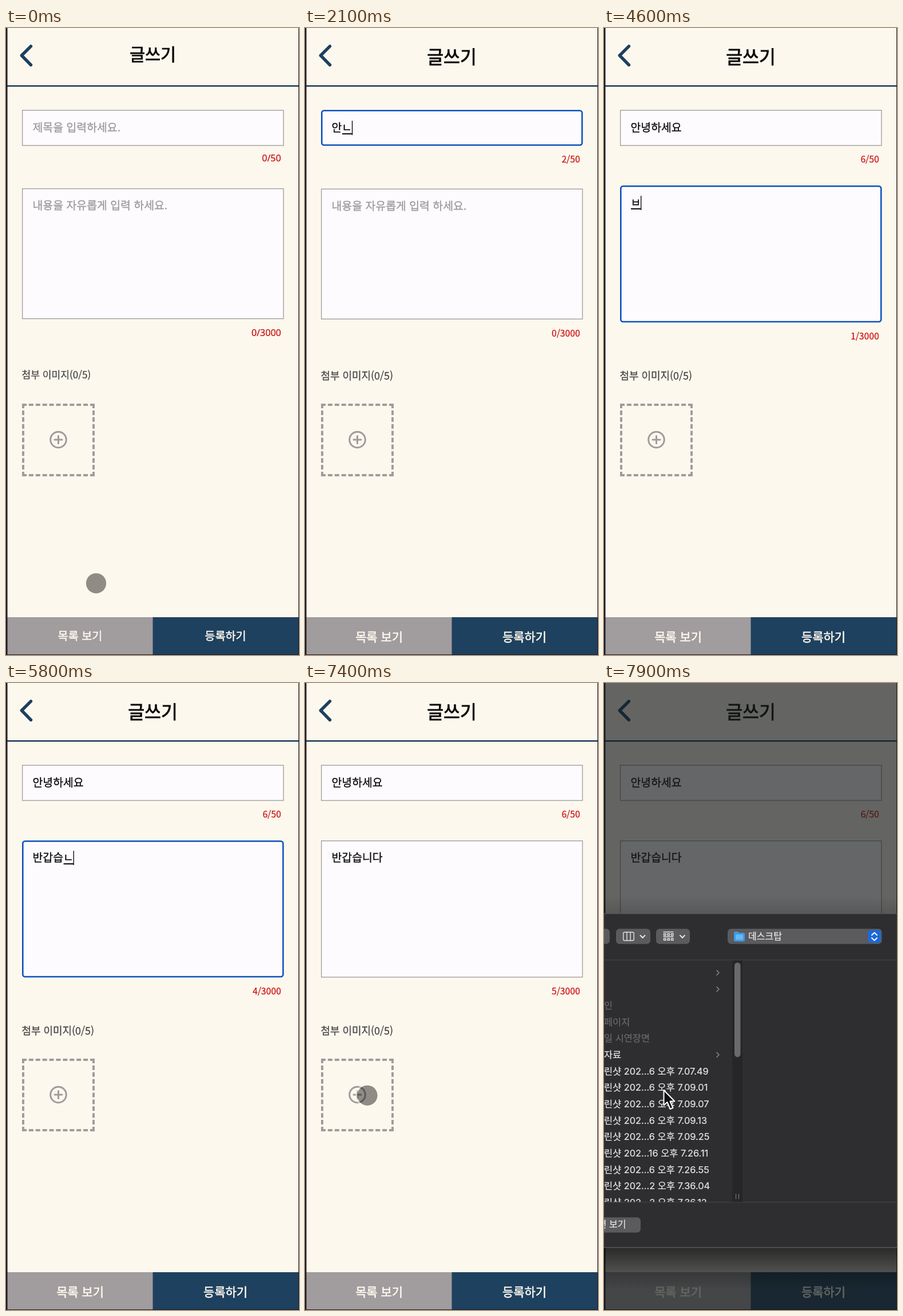
An HTML page for the animation above (8 s loop, 512 by 1095 pixels).

```html
<!DOCTYPE html>
<html lang="ko">
<head>
<meta charset="utf-8">
<title>글쓰기</title>
<style>
  html, body { margin: 0; width: 100%; height: 100%; overflow: hidden; background: #fdf8ed; }
  svg { display: block; width: 100vw; height: 100vh; }
  text {
    font-family: "Noto Sans CJK KR", "Noto Sans CJK", sans-serif; white-space: pre;
    fill: currentColor; stroke: currentColor; stroke-width: .014em;
  }
  .medium { stroke-width: .027em; }
  .mid { text-anchor: middle; }
  .count { text-anchor: end; color: #c90d0d; }
  .field { fill: #fdfbfe; }
  .entry { font-size: 19.4px; }
  .line { fill: none; stroke-linecap: round; stroke-linejoin: round; }
  #dialog text { font-family: Inter, "Noto Sans CJK KR", "Noto Sans CJK", sans-serif; font-size: 16px; color: #e6e5e6; }
  #files text { font-size: 16.4px; }
  #dialog .off { color: #6a696b; }
  .button { fill: #5b5a5c; }
  #addBox { box-sizing: border-box; width: 127px; height: 127px; border: 4px dashed #a09c9d; }
</style>
</head>
<body>
<svg viewBox="0 0 512 1095" preserveAspectRatio="none">
  <defs>
    <linearGradient id="shadeUp" x2="0" y2="1">
      <stop offset="0" stop-opacity="0"/><stop offset="1" stop-opacity=".13"/>
    </linearGradient>
    <linearGradient id="shadeDown" x2="0" y2="1">
      <stop offset="0" stop-opacity=".58"/><stop offset=".5" stop-opacity=".25"/><stop offset="1" stop-opacity="0"/>
    </linearGradient>
    <clipPath id="listClip"><rect y="82" width="224" height="422"/></clipPath>
    <path id="down" class="line" d="M-4-2 0 2.200 4-2" stroke="#e2e1e2" stroke-width="2"/>
  </defs>

  <rect width="512" height="1095" fill="#fdf8ed"/>
  <path class="line" d="M43.500 31.800 27.300 48 43.500 64.500" stroke="#1d4061" stroke-width="5.400"/>
  <rect y="100" width="512" height="2.500" fill="#1b3a5a"/>
  <text id="heading" class="mid medium" x="256.500" color="#0a0a0a">글쓰기</text>

  <rect id="titleBox" class="field"/>
  <text id="titleText" class="entry" x="46.500"></text>
  <text id="titleCount" class="count" x="480.700"></text>
  <rect id="bodyBox" class="field"/>
  <text id="bodyText" class="entry" x="46.500"></text>
  <text id="bodyCount" class="count" x="480.700"></text>
  <rect id="underline" width="17.500" height="2"/>
  <rect id="caret" width="1.300" height="25"/>

  <text id="label" x="27.500" color="#454545">첨부 이미지(0/5)</text>
  <foreignObject x="28" y="655.500" width="128" height="128"><div id="addBox"></div></foreignObject>
  <g class="line" stroke="#a09c9d" stroke-width="3">
    <circle cx="91.500" cy="719" r="13.800"/>
    <path d="M85 719H98M91.500 712.500V725.500"/>
  </g>

  <rect y="1029" width="257" height="66" fill="#a19c9e"/>
  <rect x="256.500" y="1029" width="256" height="66" fill="#1e415f"/>
  <text id="listButton" class="mid medium" x="129.500" color="#fdf8ed">목록 보기</text>
  <text id="saveButton" class="mid medium" x="383.500" color="#fdf8ed">등록하기</text>
  <path d="M0 0H2.500V1094H511V0H512V1095H0Z" fill="#1d1920"/>

  <rect id="dim" width="512" height="1095" fill="#161a1a"/>
  <g id="dialog">
    <rect y="-30" width="512" height="30" fill="url(#shadeUp)"/>
    <rect y="584" width="512" height="74" fill="url(#shadeDown)"/>
    <rect width="512" height="584" fill="#2e2d2f"/>
    <path d="M0 .5H512M0 583.500H512" stroke="#656466"/>
    <path d="M0 81.500H512M0 504.500H512" stroke="#48474a"/>
    <g class="button">
      <rect x="-40" y="27" width="50" height="26.500" rx="6"/>
      <rect x="21" y="27" width="60" height="26.500" rx="6"/>
      <rect x="91" y="27" width="59" height="26.500" rx="6"/>
      <rect x="216" y="27" width="269.500" height="26.500" rx="6"/>
      <rect x="-60" y="531" width="124" height="26.500" rx="6"/>
    </g>
    <g class="line" stroke="#e2e1e2" stroke-width="1.400">
      <rect x="33.700" y="33" width="18.600" height="14.500" rx="2.500"/>
      <path d="M40 33V47.500M46.200 33V47.500M104 32.500H121M104 41H121"/>
      <path id="tiles"/>
    </g>
    <use href="#down" x="67.500" y="40.500"/>
    <use href="#down" x="137" y="40.500"/>
    <path d="M227 34q0-2 2-2h5l2 2h8q2 0 2 2v11q0 2-2 2h-15q-2 0-2-2z" fill="#3d9be6"/>
    <rect x="230" y="37" width="13" height="9" rx="1.500" fill="#66b9f2"/>
    <text x="252" y="45.500">데스크탑</text>
    <rect x="461" y="29" width="23" height="22.500" rx="5.500" fill="#1c69d6"/>
    <path class="line" d="M468 38 472.500 33.700 477 38M468 43 472.500 47.300 477 43" stroke="#fff" stroke-width="2"/>
    <g id="files" clip-path="url(#listClip)"></g>
    <rect x="224" y="82" width="18" height="422" fill="#262527"/>
    <rect x="228" y="86" width="10.500" height="165" rx="5.200" fill="#6a696b"/>
    <path d="M230.500 490V499M235.500 490V499" stroke="#777678" stroke-width="1.200"/>
    <text x="38.500" y="549" text-anchor="end">옵션 보기</text>
  </g>

  <g id="touch">
    <circle r="19.300" fill="none" stroke="#fdf8ed" stroke-opacity=".42" stroke-width="3.200"/>
    <circle r="17.600" fill="#000" fill-opacity=".44"/>
  </g>
  <path id="arrow" d="M104.500 711V737.500L110.500 732 115.500 744 120.500 742 115.500 730.500H123.500Z" fill="#111" stroke="#fff" stroke-width="2" stroke-linejoin="round"/>
</svg>
<script>
const LOOP = 8000, FONT_READY = 300, GROWN = 4600;
const $ = id => document.getElementById(id);
const set = (el, attrs) => { for (const k in attrs) el.setAttribute(k, attrs[k]); };
const show = (id, on) => $(id).style.display = on ? '' : 'none';

// Each entry is the time of a key press and the text it leaves; true ends the composition.
const titleKeys = [
  [1800, 'ㅇ'], [1900, '아'], [2000, '안'], [2100, '안ㄴ'], [2200, '안녀'], [2300, '안녕'],
  [2400, '안녕ㅎ'], [2500, '안녕하'], [2700, '안녕핫'], [2800, '안녕하세'], [2900, '안녕하셍'],
  [3000, '안녕하세요'], [3100, '안녕하세요 ', true]
];
const bodyKeys = [
  [4600, 'ㅂ'], [4900, '바'], [5000, '반'], [5100, '반ㄱ'], [5200, '반가'], [5300, '반갑'],
  [5400, '반값'], [5500, '반갑스'], [5700, '반갑습'], [5800, '반갑습ㄴ'], [5900, '반갑습니'],
  [6000, '반갑습닏'], [6100, '반갑습니다'], [6200, '반갑습니다', true]
];
const touchMoves = [
  [[0, 157.5, 969.8], [1000, 272, 172], [1300, 274, 160], [1800, 274, 160]],
  [[3400, 274, 152], [3600, 274, 139.5], [4100, 250, 380], [4600, 250, 380]],
  [[6600, 248, 392], [7300, 109, 720.3], [7800, 109, 720.3]]
];

const names = ['', '', '인', '페이지', '일 시연장면', '자료'];
const shots = ['6 오후 7.07.49', '6 오후 7.09.01', '6 오후 7.09.07', '6 오후 7.09.13', '6 오후 7.09.25',
  '16 오후 7.26.11', '6 오후 7.26.55', '2 오후 7.36.04', '2 오후 7.36.12'];
$('files').innerHTML = [...names, ...shots.map(s => '린샷 202...' + s)].map((name, i) => {
  const y = 103.7 + i * 28.65;
  const chevron = [0, 1, 5].includes(i)
    ? `<path class="line" d="M197 ${y - 4}l4 4-4 4" stroke="#8f8e90" stroke-width="1.400"/>` : '';
  return `<text y="${y + 5.8}" class="${i > 1 && i < 5 ? 'off' : ''}">${name}</text>${chevron}`;
}).join('');
$('tiles').setAttribute('d', [0, 1, 2].map(i =>
  [35.5, 44].map(y => `M${104.5 + i * 6.5} ${y}h3.500v3h-3.500z`).join('')).join(''));

function place(id, y, size) {
  const el = $(id);
  el.setAttribute('y', y);
  el.style.fontSize = size + 'px';
}

function box(id, top, bottom, focused) {
  const w = focused ? 2.6 : 1.3;
  set($(id), {
    x: 28 + w / 2, y: top + w / 2, width: 457.5 - w, height: bottom - top - w,
    rx: focused ? 4 : 0, stroke: focused ? '#0b52bd' : '#9c9a9a', 'stroke-width': w
  });
}

function entry(id, keys, t, y, hint) {
  const key = keys.filter(k => k[0] <= t).pop();
  const el = $(id + 'Text');
  el.textContent = key ? key[1] : hint;
  set(el, { y, color: key ? '#080808' : '#9a999a' });
  $(id + 'Count').textContent = (key ? key[1].length : 0) + (id === 'title' ? '/50' : '/3000');
  return key;
}

function drawCaret(id, key, y, since, t) {
  const end = 46.5 + (key ? $(id + 'Text').getComputedTextLength() : 0);
  set($('caret'), { x: end - .3, y: y - 19 });
  set($('underline'), { x: end - 17.3, y: y + 2.8 });
  show('caret', (t - (key ? key[0] : since)) % 1000 < 500);
  show('underline', key && !key[2]);
}

function touchAt(t) {
  const path = touchMoves.find(p => t >= p[0][0] && t < p[p.length - 1][0]);
  if (!path) return null;
  const i = path.findIndex(p => p[0] > t), [a, b] = [path[i - 1], path[i]];
  const u = (t - a[0]) / (b[0] - a[0]), e = u * u * (3 - 2 * u);
  return [a[1] + (b[1] - a[1]) * e, a[2] + (b[2] - a[2]) * e];
}

function draw(t) {
  const ready = t >= FONT_READY, grown = t >= GROWN;
  place('heading', ready ? 62 : 56.8, ready ? 31.4 : 29.4);
  place('label', ready ? 614 : 611.8, ready ? 17.95 : 17.1);
  for (const id of ['listButton', 'saveButton']) place(id, ready ? 1071 : 1068.5, ready ? 20.9 : 19.65);
  place('titleCount', ready ? 234.8 : 232.5, ready ? 15.7 : 16);
  place('bodyCount', grown ? 544.3 : ready ? 539.3 : 537.8, ready ? 15.7 : 16);
  for (const id of ['titleCount', 'bodyCount']) $(id).style.fontFamily = ready ? '' : '"Noto Sans", sans-serif';

  const titleFocus = t >= 1200 && t < 4200, bodyFocus = t >= 4200 && t < 7300;
  const shift = ready ? .6 : 0, bodyY = grown ? 312 : 317 + shift;
  box('titleBox', 143, 205.8, titleFocus);
  box('bodyBox', grown ? 275 : 280 + shift, grown ? 514.3 : 508.3 + shift, bodyFocus);
  const titleKey = entry('title', titleKeys, t, 181, '제목을 입력하세요.');
  const bodyKey = entry('body', bodyKeys, t, bodyY, '내용을 자유롭게 입력 하세요.');
  if (titleFocus) drawCaret('title', titleKey, 181, 1200, t);
  else if (bodyFocus) drawCaret('body', bodyKey, bodyY, 4200, t);
  else { show('caret', false); show('underline', false); }

  const open = t >= 7700;
  show('dialog', open);
  show('dim', open);
  if (open) {
    const u = (t - 7700) / 200, e = u * (1.5 - u / 2);
    $('dialog').setAttribute('transform', `translate(0 ${380 + 22.3 * e})`);
    $('dim').setAttribute('fill-opacity', .34 + .32 * e);
  }
  const spot = touchAt(t);
  show('touch', spot);
  if (spot) $('touch').setAttribute('transform', `translate(${spot})`);
  show('arrow', t >= 7800);
}

const start = performance.now();
function tick() {
  const t = (performance.now() - start) % LOOP;
  draw(Math.floor(t / 100) * 100);
  requestAnimationFrame(tick);
}
tick();
</script>
</body>
</html>
```
